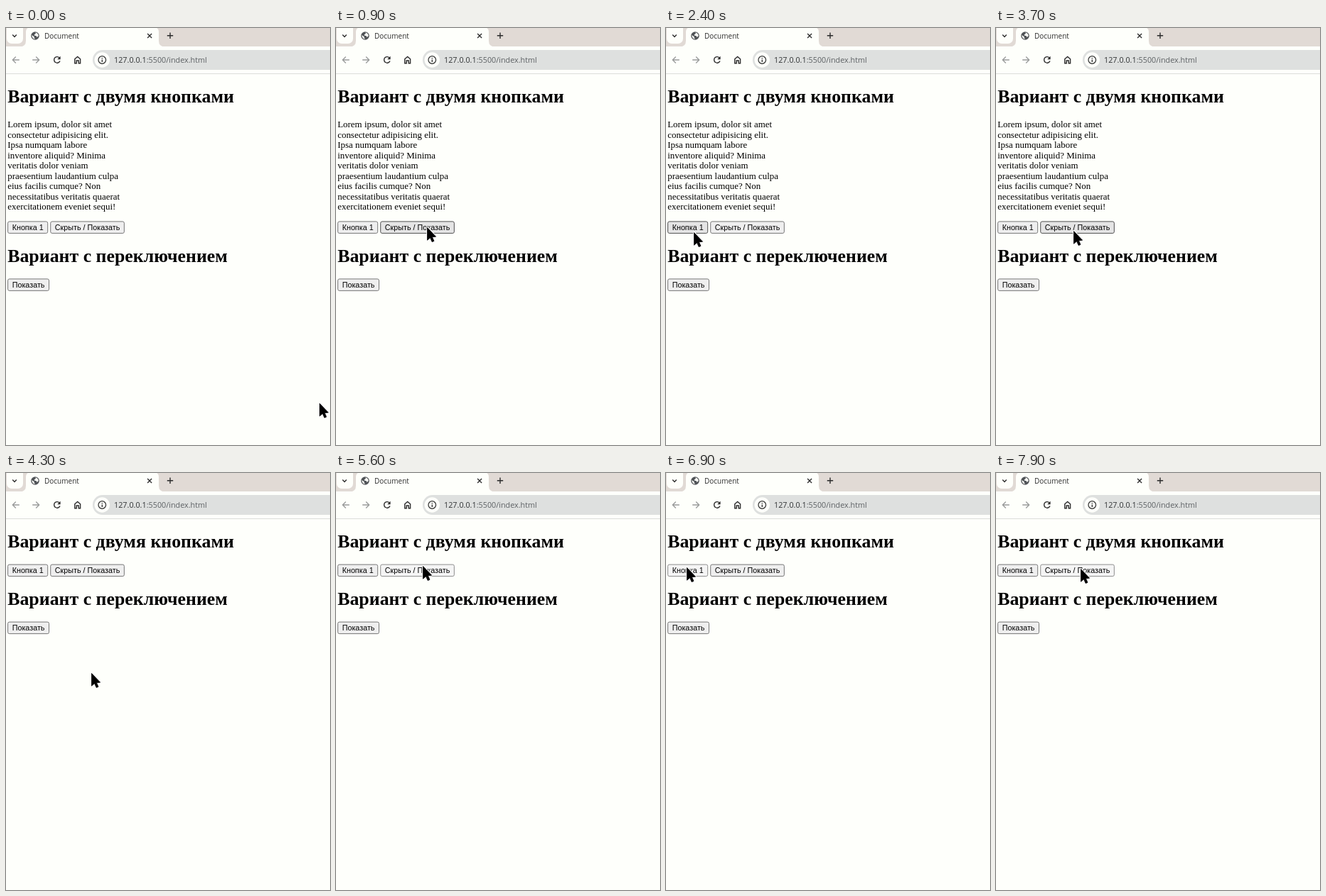
An HTML page with a canvas for the animation above (8 s loop, 456 px wide and 588 px high).

```html
<!DOCTYPE html>
<html lang="ru">
<head>
<meta charset="utf-8">
<title>Document</title>
<style>
html, body { margin: 0; width: 100%; height: 100%; overflow: hidden; background: #fefffb; }
canvas { display: block; width: 456px; height: 588px; }
</style>
</head>
<body>
<canvas id="stage"></canvas>
<script>
const W = 456, H = 588, LOOP = 8000, STEP = 100;
const ZOOM = 0.808, LEFT = 2.2;
const PAGE = '#fefffb', STRIP = '#e1dad5', DARK = '#2b2b2b';
const SERIF = '"Liberation Serif", "Times New Roman", serif';
const SANS = '"Liberation Sans", Arial, sans-serif';
const UI = '"Open Sans", "Noto Sans", sans-serif';
const HIDE_AT = 4200, TEXT_SHIFT = 143.8;

const lorem = [
  'Lorem ipsum, dolor sit amet',
  'consectetur adipisicing elit.',
  'Ipsa numquam labore',
  'inventore aliquid? Minima',
  'veritatis dolor veniam',
  'praesentium laudantium culpa',
  'eius facilis cumque? Non',
  'necessitatibus veritatis quaerat',
  'exercitationem eveniet sequi!'
];

// Pointer path: time, x, y
const path = [
  [0, 441, 529], [200, 360, 455], [400, 150, 270], [500, 72, 222],
  [600, 52, 232], [700, 82, 258], [800, 116, 277], [900, 128, 281],
  [2000, 128, 281], [2200, 88, 293], [2400, 39, 288], [2600, 31, 283],
  [3400, 31, 283], [3600, 78, 286], [3700, 109, 286], [3900, 120, 282],
  [4800, 120, 282], [5000, 121, 236], [5200, 122, 150], [5400, 122, 131],
  [6300, 122, 131], [6500, 92, 141], [6700, 40, 138], [6800, 29, 133],
  [7200, 29, 133], [7400, 75, 135], [7600, 119, 135], [8000, 119, 135]
];

// Mouse presses: start, length
const presses = [
  [1000, 100], [1200, 100], [1400, 100], [1600, 100], [3000, 100], [4100, 100],
  [5600, 100], [5800, 100], [6000, 100], [6900, 200], [7800, 200]
];

const looks = {
  normal: ['#efefef', '#767676'],
  hover: ['#e5e5e5', '#4f4f4f'],
  active: ['#f5f5f5', '#8d8d8d']
};

const canvas = document.getElementById('stage');
const ctx = canvas.getContext('2d');
const dpr = window.devicePixelRatio || 1;
canvas.width = W * dpr;
canvas.height = H * dpr;

function pointerAt(t) {
  const i = path.findIndex(p => p[0] > t);
  const a = path[i - 1], b = path[i];
  const k = (t - a[0]) / (b[0] - a[0]);
  return { x: a[1] + (b[1] - a[1]) * k, y: a[2] + (b[2] - a[2]) * k };
}

function box(x, y, w, h, r, fill) {
  ctx.beginPath();
  ctx.roundRect(x, y, w, h, r);
  ctx.fillStyle = fill;
  ctx.fill();
}

function disc(x, y, r, fill) {
  ctx.beginPath();
  ctx.arc(x, y, r, 0, 7);
  ctx.fillStyle = fill;
  ctx.fill();
}

function stroke(d, color, width) {
  ctx.strokeStyle = color;
  ctx.lineWidth = width;
  ctx.stroke(new Path2D(d));
}

function shape(d, color) {
  ctx.fillStyle = color;
  ctx.fill(new Path2D(d));
}

function label(str, x, y, font, color) {
  ctx.font = font;
  ctx.fillStyle = color;
  ctx.fillText(str, x, y);
  return ctx.measureText(str).width;
}

// Text at page zoom
function pageText(str, x, y, font) {
  ctx.save();
  ctx.translate(x, y);
  ctx.scale(ZOOM, ZOOM);
  label(str, 0, 0, font, '#000');
  ctx.restore();
}

function drawTabs() {
  box(0, 0, W, 26, 0, STRIP);
  box(1, -6, 23, 28, 7, PAGE);
  stroke('M9.2 9.6 L12 12.4 L14.8 9.6', DARK, 1.4);
  shape('M20 26.5 Q28 26 28 18 V6 Q28 -1 35 -1 H208 Q215 -1 215 6 V18 Q215 26 223 26.5 Z', PAGE);
  disc(41, 11, 5.8, '#505357');
  shape('M36.3 10 L39.6 12.3 L39.8 14 L41 15.6 Q36.6 15.4 36.3 10 Z', PAGE);
  shape('M41.5 6.3 Q45.2 7.4 45.7 11 L43.6 13 L42.8 11.2 L39.8 10.5 L40 8.9 L41.8 8.2 Z', PAGE);
  label('Document', 54, 14.6, `10px ${UI}`, '#303030');
  stroke('M199.1 8 L205.1 14 M205.1 8 L199.1 14', DARK, 1.3);
  stroke('M231 6.5 V14.9 M226.8 10.7 H235.2', DARK, 1.4);
}

function drawToolbar() {
  box(0, 26, W, 38, 0, PAGE);
  box(0, 64, W, 1, 0, '#dcdcda');
  stroke('M18.8 45 H9.4 M13.8 40.5 L9.3 45 L13.8 49.5', '#999b9b', 1.3);
  stroke('M37.2 45 H46.6 M42.2 40.5 L46.7 45 L42.2 49.5', '#999b9b', 1.3);
  stroke('M75.6 42.6 A4.3 4.3 0 1 0 76 46.4', DARK, 1.4);
  shape('M76.6 39.8 V44.2 H72.2 Z', DARK);
  stroke('M96.8 43.8 L100.7 40.5 L104.6 43.8 V49.8 H102.2 V46 H99.2 V49.8 H96.8 Z', DARK, 1.4);
  box(122, 31, 360, 28, 14, '#dee0df');
  disc(135.3, 45, 10.7, PAGE);
  stroke('M130 45 a5.3 5.3 0 1 0 10.6 0 a5.3 5.3 0 1 0 -10.6 0', DARK, 1.2);
  stroke('M135.3 44.4 V47.9 M135.3 41.9 V43.2', DARK, 1.3);
  const font = `10.8px ${UI}`;
  const host = label('127.0.0.1', 152, 48.8, font, '#303234');
  label(':5500/index.html', 152 + host, 48.8, font, '#5c6063');
}

function drawButton(text, x, y, mouse, down) {
  ctx.font = `13.333px ${SANS}`;
  const w = (ctx.measureText(text).width + 16) * ZOOM, h = 17.3;
  const over = mouse.x >= x && mouse.x <= x + w && mouse.y >= y && mouse.y <= y + h;
  const [fill, edge] = looks[over ? (down ? 'active' : 'hover') : 'normal'];
  box(x + 0.4, y + 0.4, w - 0.8, h - 0.8, 2.2, fill);
  ctx.strokeStyle = edge;
  ctx.lineWidth = 1;
  ctx.stroke();
  pageText(text, x + 8 * ZOOM, y + 12.1, ctx.font);
  return x + w;
}

function drawPage(hidden, mouse, down) {
  const shift = hidden ? 0 : TEXT_SHIFT;
  const h1 = `bold 32px ${SERIF}`;
  pageText('Вариант с двумя кнопками', LEFT, 104.9, h1);
  if (!hidden) {
    lorem.forEach((line, i) => pageText(line, LEFT, 140 + i * 18 * ZOOM, `16px ${SERIF}`));
  }
  const row = 128.7 + shift;
  const right = drawButton('Кнопка 1', LEFT, row, mouse, down);
  drawButton('Скрыть / Показать', right + 4 * ZOOM, row, mouse, down);
  pageText('Вариант с переключением', LEFT, 185.8 + shift, h1);
  drawButton('Показать', LEFT, row + 81, mouse, down);
}

function drawPointer({ x, y }) {
  ctx.save();
  ctx.translate(x, y);
  ctx.lineJoin = 'round';
  const arrow = 'M0.5 0.5 V18.2 L4.6 14.8 L7.2 20.6 L10 19.4 L7.5 13.7 L12.6 13.2 Z';
  stroke(arrow, '#fff', 2.6);
  stroke(arrow, '#000', 0.8);
  shape(arrow, '#000');
  ctx.restore();
}

function draw(t) {
  const mouse = pointerAt(t);
  const down = presses.some(([start, len]) => t >= start && t < start + len);
  ctx.setTransform(dpr, 0, 0, dpr, 0, 0);
  box(0, 0, W, H, 0, PAGE);
  drawTabs();
  drawToolbar();
  drawPage(t >= HIDE_AT, mouse, down);
  drawPointer(mouse);
}

const begin = performance.now();
function tick() {
  const t = (performance.now() - begin) % LOOP;
  draw(Math.floor(t / STEP) * STEP);
  requestAnimationFrame(tick);
}
tick();
</script>
</body>
</html>
```
